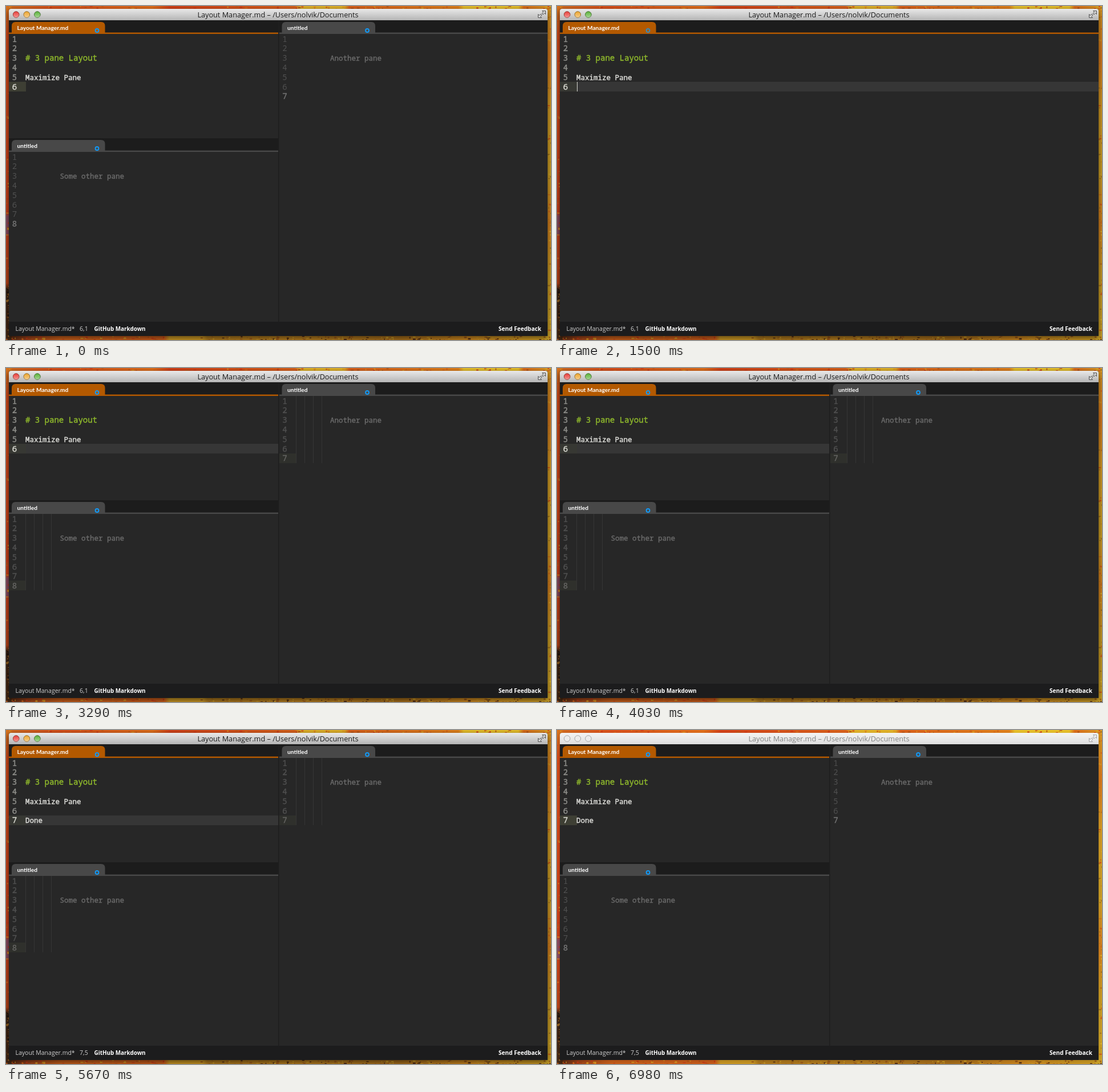
An HTML page with a canvas for the animation above (7050 ms loop, 955 by 586 pixels).

```html
<!DOCTYPE html>
<html lang="en">
<head>
<meta charset="utf-8">
<title>Layout Manager</title>
<style>
html, body { margin: 0; width: 100%; height: 100%; overflow: hidden; background: #d4561a; }
canvas, svg { position: absolute; left: 0; top: 0; width: 955px; height: 586px; }
text { white-space: pre; }
.ui { font-family: "Open Sans", "Noto Sans", sans-serif; }
.tab { font: 700 10.2px Lato, sans-serif; fill: #fff; }
.code { font-family: "Noto Sans Mono", "DejaVu Sans Mono", monospace; font-size: 12.5px; }
.big { font-size: 14px; }
.heavy { stroke: currentColor; stroke-width: .4px; }
</style>
</head>
<body>
<canvas id="wall" width="955" height="586"></canvas>
<svg id="stage" viewBox="0 0 955 586"></svg>
<script>
const LOOP = 7050, W = 955, H = 586;
const ROW = 16.8, CHAR = 7.5;
const BLINKS = [450, 900, 1200, 1650, 2090, 2390, 2840, 3290, 3580, 4030, 4480,
  4770, 4920, 5670, 6120, 6420, 6860, 6980];
const VIEWS = [[0, 'idle'], [1500, 'max'], [3290, 'split'], [6980, 'away']];
const TYPED = [[0, ''], [4920, 'D'], [5070, 'Do'], [5220, 'Done']];
const LINES = [[0, 6], [4630, 7]];

const at = (table, t) => table.filter(step => step[0] <= t).pop()[1];
const rect = (x, y, w, h, fill, more = '') =>
  `<rect x="${x}" y="${y}" width="${w}" height="${h}" fill="${fill}" ${more}/>`;
const text = (x, y, str, cls, fill, more = '') =>
  `<text x="${x}" y="${y}" class="${cls}" fill="${fill}" color="${fill}" ${more}>${str}</text>`;
const path = (d, fill, more = '') => `<path d="${d}" fill="${fill}" ${more}/>`;

const defs = `<defs>
<linearGradient id="bar" x2="0" y2="1"><stop stop-color="#e9e9e9"/><stop offset="1" stop-color="#b5b5b5"/></linearGradient>
<linearGradient id="pale" x2="0" y2="1"><stop stop-color="#f4f4f4"/><stop offset="1" stop-color="#dedede"/></linearGradient>
<linearGradient id="gloss" x2="0" y2="1"><stop stop-color="#fff" stop-opacity="0"/><stop offset="1" stop-color="#fff" stop-opacity=".45"/></linearGradient>
<filter id="blur" x="-5%" y="-5%" width="110%" height="110%"><feGaussianBlur stdDeviation="6"/></filter>
</defs>`;

function titleBar(away) {
  const lights = [['#ea3f3a', '#8e2a26'], ['#eda52e', '#8f641c'], ['#5cb33a', '#386b24']];
  let s = path('M5 25V9Q5 5 9 5H945Q949 5 949 9V25Z', away ? 'url(#pale)' : 'url(#bar)');
  lights.forEach(([fill, edge], i) => {
    const ring = `cx="${17.7 + i * 18.6}" cy="15" r="5.3"`;
    s += `<circle ${ring} fill="${away ? '#ececec' : fill}" stroke="${away ? '#a8a8a8' : edge}"/>`;
    if (!away) s += `<circle ${ring} fill="url(#gloss)"/>`;
  });
  const ink = away ? '#a0a0a0' : '#545454';
  s += path('M939.5 8.5H945.5V14.5L943.5 12.5L941 15L939 13L941.5 10.5Z M932.5 14.5L934.5 16.5L937 14L939 16L936.5 18.5L938.5 20.5H932.5Z',
    away ? '#f0f0f0' : '#d0d0d0', `stroke="${ink}"`);
  return s + text(476.5, 19.5, 'Layout Manager.md – /Users/nolvik/Documents', 'ui',
    away ? '#858585' : '#1c1c1c', 'font-size="12.7" text-anchor="middle"');
}

function tabBar(x, y, w, label, color, ringAlpha = 1) {
  const l = x + 5, r = x + 168.5, top = y + 3;
  return rect(x, y, w, 24, '#1c1c1c')
    + path(`M${l} ${y + 22}V${top + 7}Q${l} ${top} ${l + 7} ${top}H${r - 7}Q${r} ${top} ${r} ${top + 7}V${y + 22}Z`, color)
    + rect(x, y + 21.5, w, 2.5, color)
    + text(x + 14.5, y + 17, label, 'tab', '#fff')
    + `<circle cx="${x + 154.5}" cy="${y + 18}" r="2.9" fill="none" stroke="#1298f4" stroke-width="2" opacity="${ringAlpha}"/>`;
}

function numbers(x, y, count, ink, lastInk, heavy) {
  let s = '';
  for (let i = 0; i < count; i++) {
    const last = i === count - 1;
    s += text(x + 5.8, Math.round(y + 13.6 + i * ROW), i + 1,
      'code big' + (heavy || last ? ' heavy' : ''), last ? lastInk : ink);
  }
  return s;
}

function sidePane(x, y, w, h, count, str, focused) {
  const top = y + 24, rows = Math.round(count * ROW);
  let s = rect(x, y, w, h, '#272727') + tabBar(x, y, w, 'untitled', '#484848');
  if (focused) {
    s += rect(x, top + rows - 17, 30, 17, '#2f302c');
    for (let i = 0; i < 4; i++) s += rect(Math.floor(x + 29.5 + i * 15), top, 1, rows, '#353535');
  }
  return s + numbers(x, top, count, '#505050', focused ? '#656562' : '#747474', focused)
    + text(x + 29.5 + 8 * CHAR, Math.round(top + 13.6 + 2 * ROW), str, 'code heavy', '#6a6a6a');
}

function mainPane(view, count, typed, cursor) {
  const max = view === 'max', focused = max || view === 'split';
  const w = max ? 944 : 472, y = Math.round(49 + (count - 1) * ROW);
  let s = rect(5, 25, w, max ? 529 : 206, '#272727')
    + tabBar(5, 25, w, 'Layout Manager.md', '#b35900', max ? .75 : 1);
  if (focused) s += rect(35, y, w - 30, 17, '#363636');
  s += rect(5, y, 30, 17, focused ? '#373833' : '#3e3f34');
  s += numbers(5, 49, count, '#90908c', '#dadad2', true)
    + text(34, 96, '# 3 pane Layout', 'code big heavy', '#8fb92c')
    + text(34, 130, 'Maximize Pane', 'code heavy', '#dededa')
    + text(34, 163, typed, 'code heavy', '#dededa');
  if (cursor) s += rect(Math.floor(34.5 + (typed ? 0 : .5) + typed.length * CHAR), y, 1, 17, '#d6d6d0');
  return s;
}

function statusBar(count, typed) {
  return rect(5, 554, 944, 25, '#1c1c1d')
    + text(16.5, 570, 'Layout Manager.md*', 'ui', '#cfcfcf', 'font-size="10.5"')
    + text(129, 570, `${count},${typed.length + 1}`, 'ui', '#cfcfcf', 'font-size="10.6"')
    + text(154.5, 570, 'GitHub Markdown', 'ui', '#fff', 'font-size="9.9" font-weight="700"')
    + text(938, 570, 'Send Feedback', 'ui', '#fff', 'font-size="10.1" font-weight="700" text-anchor="end"');
}

function scene(view, count, typed, cursor) {
  const away = view === 'away', focused = view === 'split';
  let s = defs + rect(3, 7, 948, 577, '#000', `filter="url(#blur)" opacity="${away ? .22 : .55}"`)
    + path('M5 579V9Q5 5 9 5H945Q949 5 949 9V579Z', '#272727') + titleBar(away);
  s += mainPane(view, count, typed, cursor);
  if (view !== 'max') {
    s += sidePane(5, 232, 472, 322, 8, 'Some other pane', focused)
      + sidePane(478.5, 25, 470.5, 529, 7, 'Another pane', focused)
      + rect(477, 25, 1.5, 529, '#1e1e1e');
  }
  return s + statusBar(count, typed);
}

// Painted desktop: colour bands along each edge with a few seeded dabs on top.
function paintWall() {
  const c = document.getElementById('wall').getContext('2d');
  let seed = 7;
  const rnd = () => (seed = seed * 16807 % 2147483647) / 2147483647;
  const band = (x, y, w, h, stops) => {
    const g = w > h ? c.createLinearGradient(0, 0, W, 0) : c.createLinearGradient(0, 0, 0, H);
    stops.forEach(([p, color]) => g.addColorStop(p, color));
    c.fillStyle = g;
    c.fillRect(x, y, w, h);
  };
  const dabs = (n, x, y, w, h, colors) => {
    for (let i = 0; i < n; i++) {
      c.fillStyle = colors[Math.floor(rnd() * colors.length)];
      c.fillRect(x + rnd() * w, y + rnd() * h, 1 + rnd() * 4, 1 + rnd() * 2);
    }
  };
  band(0, 0, W, 10, [[0, '#d87022'], [.1, '#e0521c'], [.27, '#e8731c'], [.3, '#d9441a'],
    [.53, '#e0641c'], [.54, '#e8b82a'], [.62, '#e8b82a'], [.63, '#e2641c'], [.83, '#e8851c'],
    [.84, '#efc62c'], [.94, '#efc62c'], [.95, '#e2701c'], [1, '#e0a024']]);
  band(0, 572, W, 14, [[0, '#4a2814'], [.04, '#a8461a'], [.1, '#d8661c'], [.29, '#d8621c'],
    [.3, '#d9a226'], [.36, '#d9a226'], [.37, '#b8801e'], [.55, '#c08420'], [.72, '#b0741c'],
    [.85, '#d98f20'], [1, '#d9a826']]);
  band(0, 0, 10, H, [[0, '#dc7a20'], [.08, '#e0501a'], [.62, '#d8441a'], [.63, '#925064'],
    [.68, '#925064'], [.69, '#d0441a'], [.83, '#c24618'], [.85, '#3c2414'], [1, '#4a2a14']]);
  band(944, 0, 11, H, [[0, '#e0a024'], [.15, '#e2801e'], [.3, '#dfa426'], [.5, '#d8a828'],
    [.65, '#e08820'], [.8, '#d4a426'], [1, '#d8ac2a']]);
  const warm = ['#e8a024', '#d83c18', '#c25a18', '#e06a1c'];
  dabs(70, 0, 0, W, 4, warm);
  dabs(30, 0, 0, 4, 480, warm);
  dabs(40, 0, 490, 5, 90, ['#20140c', '#6a3816', '#a87024']);
  dabs(60, 949, 0, 6, H, ['#e8bc30', '#c87a1c', '#e0661c', '#a87820']);
  dabs(50, 0, 579, 280, 7, warm);
  dabs(130, 340, 579, 615, 7, ['#5a3014', '#d8a428', '#a8601a']);
}

paintWall();
const stage = document.getElementById('stage');
const start = performance.now();
let shown = '';

function tick() {
  const t = (performance.now() - start) % LOOP;
  const cursor = BLINKS.filter(b => b <= t).length % 2 === 1;
  const state = [at(VIEWS, t), at(LINES, t), at(TYPED, t), cursor];
  const key = state.join();
  if (key !== shown) {
    shown = key;
    stage.innerHTML = scene(...state);
  }
  requestAnimationFrame(tick);
}
tick();
</script>
</body>
</html>
```
